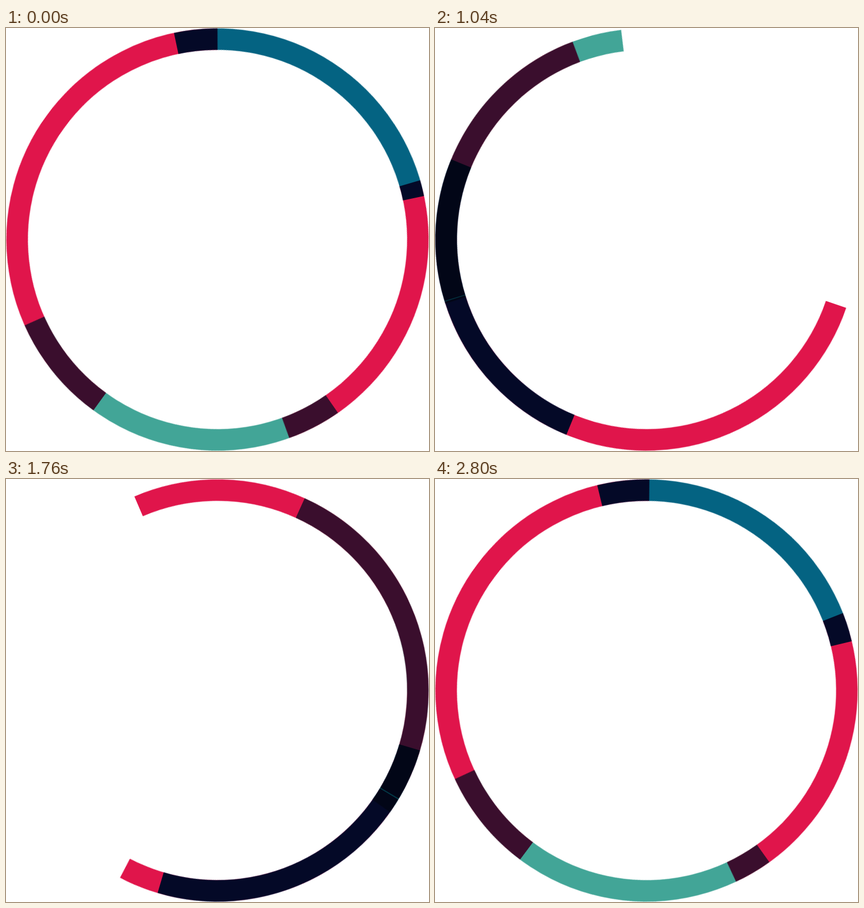
These frames come from a looping animation (748 by 748 pixels, 2.88 s). An HTML page:

```html
<!DOCTYPE html>
<html lang="en">
<head>
<meta charset="utf-8">
<title>Ring loader</title>
<style>
  html, body { margin: 0; width: 100%; height: 100%; overflow: hidden; background: #fff; }
  svg { display: block; width: 100vw; height: 100vh; background: #fff; isolation: isolate; }

  circle {
    fill: none;
    stroke-width: 38;
    stroke-dasharray: var(--len) 360;
    transform-origin: 374px 374px;
    mix-blend-mode: multiply;
    animation: spin 2880ms cubic-bezier(.33333, 0, .66667, 1) infinite;
  }

  /* circles start at three o'clock, angles are counted from the top */
  @keyframes spin {
    from { transform: rotate(calc(var(--start) - 90deg)); }
    to { transform: rotate(calc(var(--start) - 90deg + var(--turns) * 360deg)); }
  }

  .blue  { stroke: #046382; --start: -11.9deg; --len: 90; --turns: 2; }
  .teal  { stroke: #42a597; --start: 145.2deg; --len: 100.8; --turns: 1; }
  .long  { stroke: #e0154b; --start: 216deg; --len: 144; --turns: -1; }
  .short {
    stroke: #e0154b; --start: 73.7deg; --len: 86.4; --turns: 2;
    animation-timing-function: cubic-bezier(.33333, 0, .83333, 1);
  }
</style>
</head>
<body>
<svg viewBox="0 0 748 748">
  <circle class="blue" cx="374" cy="374" r="354.3" pathLength="360"/>
  <circle class="teal" cx="374" cy="374" r="354.3" pathLength="360"/>
  <circle class="long" cx="374" cy="374" r="354.3" pathLength="360"/>
  <circle class="short" cx="374" cy="374" r="354.3" pathLength="360"/>
</svg>
</body>
</html>
```
